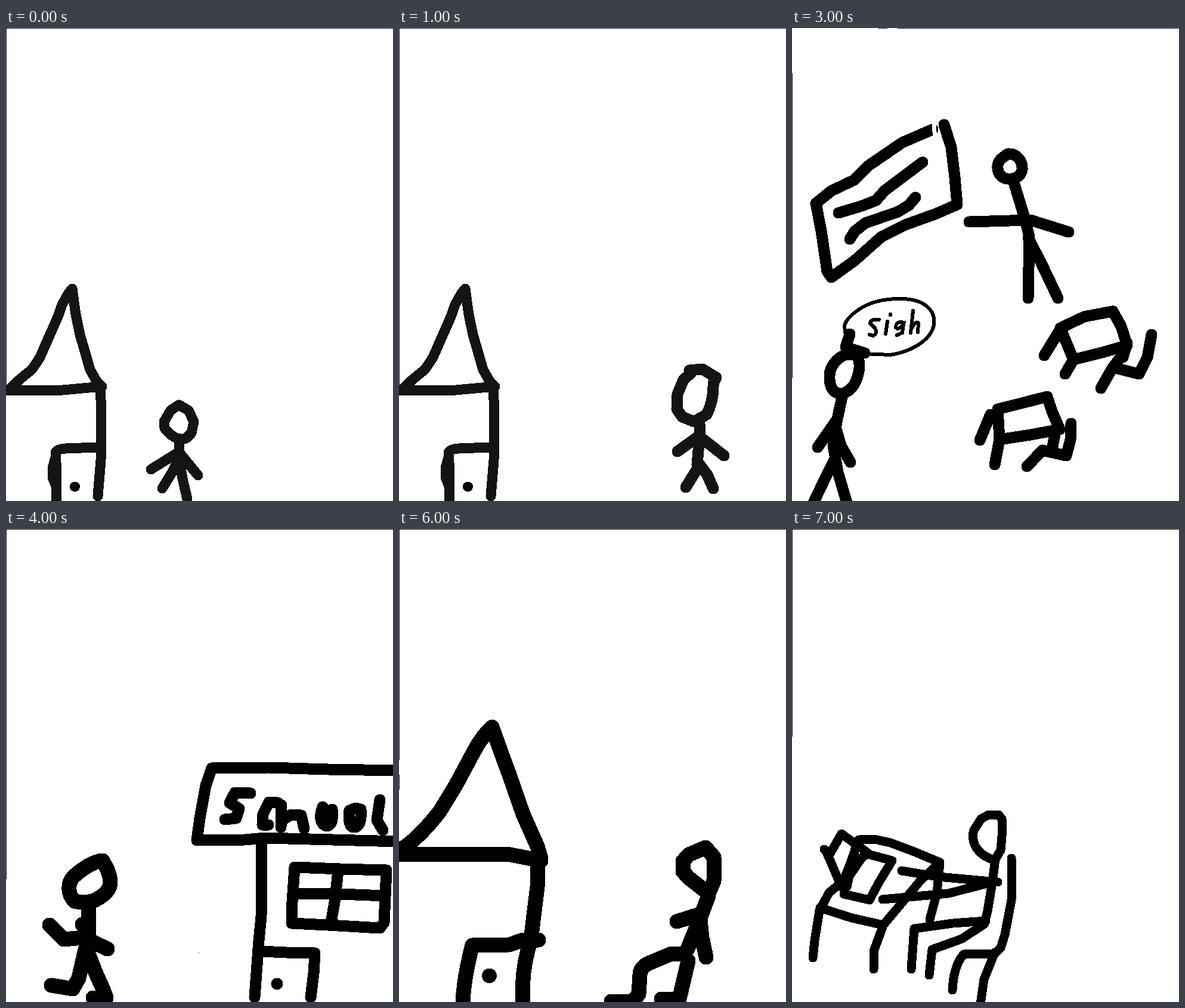
An HTML page for the animation above (8 s loop, 649 by 793 pixels).

```html
<!DOCTYPE html>
<html lang="en">
<head>
<meta charset="utf-8">
<title>School day</title>
<style>
  html, body { margin: 0; width: 100%; height: 100%; overflow: hidden; background: #fff; }
  svg { display: block; width: 649px; height: 793px; }
  path { fill: none; stroke: currentColor; stroke-linecap: round; stroke-linejoin: round; }
  .w6 path { stroke-width: 6; }
  .w15 path { stroke-width: 15; }
  .w17 path { stroke-width: 17; }
  .w19 path { stroke-width: 19; }
  .w25 path { stroke-width: 25; }
  path.edge { stroke: #1c1c1c; stroke-width: 1; stroke-linecap: butt; }
  path.gap { stroke: #fff; stroke-width: 7; }
  path.blob { fill: currentColor; }
  .ink { color: #141412; }
  .scene {
    visibility: hidden;
    animation: show 8s step-end infinite;
    animation-delay: calc(var(--i) * 1s - 8s);
  }
  @keyframes show {
    0% { visibility: visible; }
    12.5%, 100% { visibility: hidden; }
  }
</style>
</head>
<body>
<svg viewBox="0 0 649 793" shape-rendering="crispEdges">
  <defs>
    <g id="home" class="w17">
      <path class="edge" d="M0 .5H649M.5 0V606"/>
      <path d="M5 607L22 590 44 572 57 552 87 484 94 464 104 446 111 437 113 452 117 480 124 514 131 538 141 573 152 592 160 601"/>
      <path d="M2 608L40 607 84 608 161 601M158 606L160 640 159 725 154 785"/>
      <path d="M152 703L100 705Q83 706 83 714L85 745 84 796M83 720L78 738V753L84 768"/>
      <circle cx="115.5" cy="769" r="8.5"/>
    </g>

    <g id="pupil" class="w19">
      <path d="M102 590L124 588 147 602 142 612Q143 640 131 664L110 676 90 668 81 655 82 630 92 606 105 594"/>
      <path d="M119 680V700L115 748M82 726L118 700 160 733M96 786L112 760 120 749 132 765 142 788"/>
    </g>

    <g id="school" class="w19">
      <path class="edge" d="M0 .5H649M.5 0V587"/>
      <path d="M660 405L540 403 440 400 345 401 335 430 325 485 320 522 400 521 435 518 660 524"/>
      <path d="M429 525L428 650 424 690 417 785M428 708L470 710 518 711 516 745 511 785"/>
      <path d="M484 567L560 570 638 572 634 660 627 669 540 664 479 661 479 640ZM484 611L560 612 636 615M557 572L552 620 545 660"/>
      <path d="M410 443L384 442 375 459 391 469 386 485 367 487"/>
      <path d="M456 459L441 458 431 478 430 496 440 496M462 463L461 500M462 489L478 479 495 480 500 502"/>
      <path class="blob" d="M531 466Q522 492 537 498 550 497 547 470L538 475Z"/>
      <path d="M576 472Q573 499 583 500 597 500 595 470L586 468ZM627 454L622 488 632 505"/>
      <circle cx="454.5" cy="762.5" r="10"/>
    </g>

    <g id="house" class="w25">
      <path class="edge" d="M0 .5H649M.5 0V387M.5 412V437"/>
      <path d="M3 537Q30 522 68 474L95 430 125 374Q140 346 156 332L171 374 185 412 208 478 232 532 238 552"/>
      <path d="M0 545H182L238 556M232 560V600L227 640 221 690Q204 740 208 796"/>
      <path d="M234 689H208L185 697 123 698Q108 755 107 796"/>
      <circle cx="151.5" cy="749" r="12.5"/>
    </g>

    <g id="walker" class="w25">
      <path d="M645 615L630 655 610 704M592 658L630 646 634 685 641 718"/>
      <path d="M604 712H583L545 728Q530 735 530 748L528 780 518 792H482M611 724L596 788H566"/>
    </g>
  </defs>

  <g class="scene ink" style="--i:0">
    <use href="#home"/>
    <g class="w17">
      <path d="M290 632L276 641 265 660 266 671 276 682 290 690 302 688 311 679 315 660 306 641Z"/>
      <path d="M290 688V735M243 740L290 711 322 750M262 772L279 744 290 722 296 755 304 790"/>
    </g>
  </g>

  <g class="scene ink" style="--i:1">
    <use href="#home"/>
    <use href="#pupil" x="385" y="-16"/>
  </g>

  <g class="scene" style="--i:2">
    <use href="#school"/>
    <use href="#pupil"/>
  </g>

  <g class="scene" style="--i:3">
    <path class="edge" d="M145 .5H160M177 .5H649M.5 76V587"/>
    <g class="w19">
      <!-- board -->
      <path d="M236 170L185 192 128 231 104 255 66 273 40 294 49 340 59 408 66 418 105 390 150 350 190 330 240 312 277 296 273 250 267 200 255 162"/>
      <path class="gap" d="M239 154Q237 170 241 184"/>
      <path d="M78 310L118 298 141 289 155 273 219 225M97 354L105 341 123 327 178 308 196 297 207 284"/>
      <!-- teacher -->
      <path d="M362 211C378 210 387 224 386 237 384 250 372 254 362 253 348 251 344 241 345 230 347 220 354 217 362 211Z"/>
      <path d="M373 262L390 318 398 350 396 453M297 325L400 322 464 342M396 352L416 390 446 453"/>
      <!-- pupil -->
      <path d="M91 547C75 553 63 568 63 583 62 604 71 614 84 613 101 609 110 592 113 570Q114 556 107 548Z"/>
      <path d="M97 513L90 535 122 545M85 614L75 660 69 700 77 745 92 796M75 657L43 703M72 665L82 700 98 728M72 722L55 756 36 796"/>
      <!-- desks -->
      <path d="M450 503L490 484 538 475 552 500 562 532 520 544 472 556ZM450 505L423 549M472 556L458 580M562 528L555 552M603 514L596 552 582 580 538 569 518 604M553 550L538 569"/>
      <path d="M345 639L385 629 428 618 437 645 449 673 400 682 348 690ZM333 648L315 691M348 690L340 732M442 675L437 702M468 663L467 690 460 717 420 708 394 735"/>
    </g>
    <g class="w6">
      <path d="M120 546L165 548Q203 542 226 520 245 499 235 477 222 455 185 454 140 453 112 472 90 487 88 500L90 515"/>
      <path d="M146 489Q132 487 131 495L139 503Q144 512 136 516L130 514"/>
      <path d="M160 492L157 513M165 480V481"/>
      <path d="M188 494Q175 490 174 502 179 508 187 496L185 511 176 515M203 474L199 511M200 505Q208 489 212 495L211 510"/>
    </g>
  </g>

  <g class="scene" style="--i:4">
    <use href="#school"/>
    <g class="w25">
      <path d="M162 556C145 557 124 573 113 583 103 594 103 612 115 624Q133 629 150 622C167 613 176 602 175 590 174 577 169 569 162 556Z"/>
      <path d="M138 630V690L133 712M128 663H138M73 664L97 688 130 685 170 704"/>
      <path d="M133 705L122 753 112 771 76 765M138 712L150 743 163 772 168 786H146"/>
    </g>
    <rect x="323" y="710" width="1" height="1"/>
  </g>

  <g class="scene" style="--i:5">
    <use href="#house"/>
    <use href="#walker"/>
    <g class="w25">
      <path d="M660 528L640 536 612 546 602 557V574L612 585 648 613"/>
    </g>
  </g>

  <g class="scene" style="--i:6">
    <use href="#house"/>
    <g transform="translate(-126 0)">
      <use href="#walker"/>
      <g class="w25">
        <path d="M640 534L612 546 602 557V574L612 585 645 611 654 590V550Z"/>
      </g>
    </g>
  </g>

  <g class="scene" style="--i:7">
    <path class="edge" d="M0 .5H649M.5 0V348"/>
    <g class="w15">
      <path d="M341 554L350 538 352 515V486L346 479H330L317 486 305 505Q300 520 310 536 322 551 340 555"/>
      <path d="M341 553L336 592 328 640 323 660M184 573L245 583 345 592M152 621L262 611 340 591"/>
      <path d="M325 657L270 661 205 670 200 738M323 662L285 687 235 705 230 748"/>
      <path d="M368 552V622L357 680 350 702 340 712 288 713Q271 732 269 773M340 710L322 755 316 797"/>
      <path d="M112 521L98 560 86 590 62 610 46 640 38 690 35 719M47 635L100 652 153 664 137 708V738"/>
      <path d="M112 521L138 520 165 526 205 541 248 559 215 590 190 620 153 664M248 560L243 610 231 655"/>
      <path d="M54 537L64 544 83 511 127 543M58 542L83 600M108 527L92 600"/>
      <path d="M127 545L168 556 146 592 130 622 87 612 96 582 118 550Z"/>
    </g>
  </g>
</svg>
</body>
</html>
```
